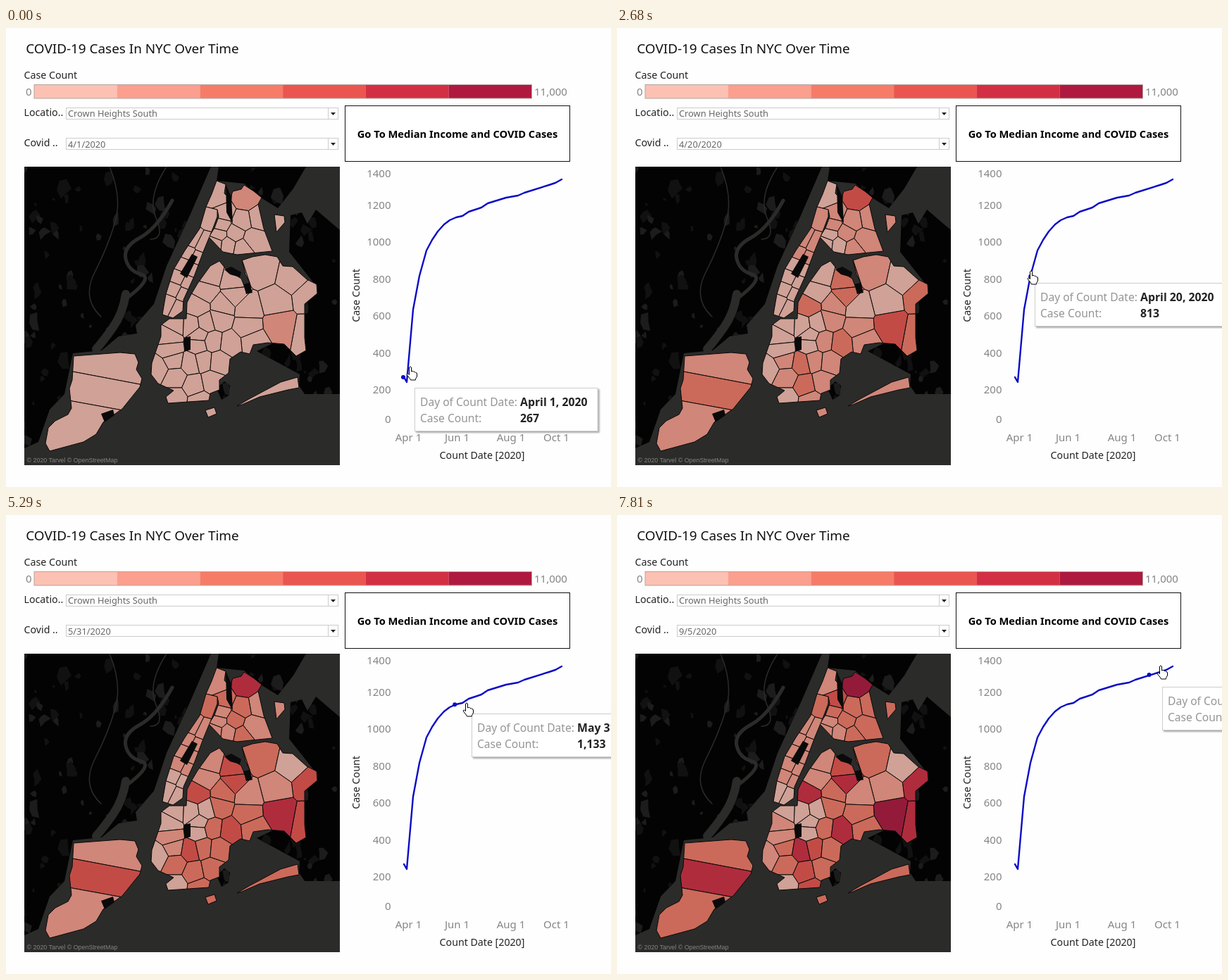
Write an HTML page that moves like this. It is 859 px wide and 652 px high and loops after 8 s.

```html
<!DOCTYPE html>
<html lang="en">
<head>
<meta charset="utf-8">
<title>COVID-19 Cases In NYC Over Time</title>
<style>
html, body { margin: 0; width: 100%; height: 100%; overflow: hidden; background: #fefefe; }
svg { display: block; width: 859px; height: 652px; font-family: "Noto Sans", "Open Sans", sans-serif; fill: #222; }
.label { font-size: 14.2px; font-weight: 500; }
.tick { font-size: 15px; fill: #858585; }
.field { font-size: 12.8px; fill: #666; }
.end { text-anchor: end; }
.mid { text-anchor: middle; }
.box { fill: #fff; stroke: #ccc; }
#tip { font-size: 15.8px; filter: drop-shadow(2px 2px 1px #0005); }
#tip .key { font-size: 15.6px; fill: #959595; }
#tip .val { font-weight: 600; }
.cell, .coast { stroke: #0a0a0a; stroke-linejoin: round; }
.cell { fill-opacity: .8; }
</style>
</head>
<body>
<svg viewBox="0 0 859 652">
  <defs id="clips">
    <clipPath id="frame"><rect x="26" y="197" width="448" height="424"/></clipPath>
    <clipPath id="shore"></clipPath>
  </defs>

  <text x="28.3" y="35.7" font-size="18.9" fill="#111">COVID-19 Cases In NYC Over Time</text>
  <text x="25.5" y="72" class="label">Case Count</text>
  <text x="28" y="96" class="tick">0</text>
  <text x="750" y="96" class="tick">11,000</text>
  <g id="legend"></g>

  <text x="25.5" y="124.5" class="label">Locatio..</text>
  <text x="25.5" y="168" class="label">Covid ..</text>
  <g id="fields"></g>
  <text x="88" y="126" class="field">Crown Heights South</text>
  <text x="88" y="169.5" class="field" id="date"></text>

  <rect x="481.5" y="110.5" width="319" height="79" fill="#fff" stroke="#111"/>
  <text x="641" y="156" class="mid" font-size="14.67" font-weight="700" fill="#000">Go To Median Income and COVID Cases</text>

  <g clip-path="url(#frame)">
    <rect x="26" y="197" width="448" height="424" fill="#2b2b2a"/>
    <g id="land"></g>
    <g id="woods" clip-path="url(#shore)"></g>
    <g fill="none" stroke="#2b2b2a" stroke-linecap="round">
      <path stroke-width="1.5" d="M147,197Q165,240 155,275T126,347T135,410M228,197Q200,240 213,270T205,300"/>
      <path stroke-width="5" d="M236,245Q214,285 190,298T170,328T192,350T170,385"/>
      <path stroke-width="12" d="M170,378Q166,405 152,425T128,456"/>
    </g>
    <g id="city"></g>
    <g id="parks" fill="#0a0a0a"></g>
    <text x="29.5" y="617" font-family="Liberation Sans, Arial, sans-serif" font-size="8.9" fill="#858585">© 2020 Tarvel © OpenStreetMap</text>
  </g>

  <g id="axes"></g>
  <text x="676" y="612" class="label mid">Count Date [2020]</text>
  <text transform="translate(502 380) rotate(-90)" class="label mid">Case Count</text>
  <polyline fill="none" stroke="#0b0bc6" stroke-width="2.4" stroke-linejoin="round" stroke-linecap="round"
    points="565,496 569,503 578,400 587,352 597,316 605,301 613,289 622,279 630,273 639,269 648,267 657,261 675,255 684,249 710,241 727,238 736,234 771,223 780,220 789,215"/>
  <circle id="dot" r="3" fill="#0b0bc6"/>

  <g id="tip">
    <rect class="box" id="card" x=".5" y=".5" height="61"/>
    <text class="key" x="8" y="26">Day of Count Date:</text>
    <text class="key" x="8" y="48.5">Case Count:</text>
    <text class="val" x="150" y="26" id="day"></text>
    <text class="val" x="150" y="48.5" id="count"></text>
  </g>
  <path id="hand" fill="#fff" stroke="#000" stroke-linejoin="round"
    d="M-1.5,1q1.5,-2 3,0v6l1,-.5q2,-.5 2.5,1q2,-.5 2.5,1q2,0 2,1.5v4l-2,3.5v1.5h-7l-1,-2 -4,-5q-1,-2 1,-2l2,1.5z"/>
</svg>

<script>
const $ = id => document.getElementById(id);
const add = (id, markup) => $(id).insertAdjacentHTML('beforeend', markup);

// Legend, drop-downs and axes
const shades = ['#fcc1b3', '#fc9f8e', '#f67c68', '#eb554f', '#d32f44', '#af193f'];
shades.forEach((c, i) =>
  add('legend', `<rect x="${40 + i * 117.7}" y="81" width="117.8" height="19" fill="${c}"/>`));
add('legend', '<rect x="40" y="80.5" width="706.5" height="19.5" fill="none" stroke="#b5a5a0"/>');

for (const y of [113.5, 156.5])
  add('fields', `<rect class="box" x="85.5" y="${y}" width="386" height="16"/>
    <path d="M457.5,${y}v16" stroke="#ccc"/><path d="M461,${y + 6.5}h7l-3.5,4z"/>`);

const countY = n => 566 - .262 * n;
for (let n = 0; n <= 1400; n += 200) {
  const y = Math.min(556, Math.max(207, countY(n)));
  add('axes', `<text class="tick end" x="546.5" y="${y + 5.3}">${n}</text>`);
}
Object.entries({ Apr: 571.5, Jun: 640.5, Aug: 717, Oct: 781.5 }).forEach(([month, x]) =>
  add('axes', `<text class="tick mid" x="${x}" y="587.3">${month} 1</text>`));

// Dark surroundings with faint seeded woods
const mainland = '26,197 291,197 262,264 228,338 210,392 184,422 186,434 160,438 136,458 95,462 83,520 62,542 46,588 26,597';
const north = '302,197 426,197 408,228 386,256 362,241 338,221 299,217';
const island = '404,266 420,262 428,278 440,258 474,287 474,520 424,520 416,508 417,492 356,459 395,440 440,366 402,318';
const marsh = '299,512 310,502 318,508 316,522 306,528';
for (const points of [mainland, north, island, marsh]) {
  add('land', `<polygon points="${points}" fill="#030303"/>`);
  add('shore', `<polygon points="${points}"/>`);
}

let seed = 7;
const rnd = () => (seed = seed * 16807 % 2147483647) / 2147483647;
for (let i = 0; i < 190; i++) {
  const x = 26 + rnd() * 448, y = 197 + rnd() * 400, r = 2 + rnd() * 7;
  const points = [0, 1, 2, 3, 4, 5].map(k => {
    const d = r * (.4 + rnd());
    return [x + d * Math.cos(k), y + d * Math.sin(k) * 1.3];
  });
  add('woods', `<polygon points="${points.join(' ')}" fill="${rnd() < .6 ? '#111' : '#1c1c1c'}"/>`);
}

// Each borough is a coast split into Voronoi districts; a site is x, y and its final colour level
const sites = text => text.split(' ').map(s => s.split(',').map(Number));
const manhattan = sites('291,267,2.6');
for (let u = 0; u <= 1; u += .2)
  for (const side of [-8, 8])
    manhattan.push([272 - 34 * u + side, 305 + 88 * u + side / 2, 1.9 - 1.1 * u]);

const boroughs = [
  ['96,466 162,461 183,463 188,475 185,485 193,498 190,510 165,541 138,560 128,577 110,588 62,601 56,590 60,568 70,558 88,549 93,540 90,512 94,500',
    sites('127,475,2.05 120,512,4.4 112,556,2.05')],
  ['299,217 312,222 310,235 318,243 322,232 334,229 338,223 352,232 363,241 358,250 366,285 378,317 328,322 308,318 288,297 296,284 302,268 300,258 284,254 292,236',
    sites('300,240,1.5 340,243,5.6 309,263,3.1 358,270,2.05 305,280,2.1 335,274,2.7 350,300,2.05 325,292,2.7 302,293,1.5 297,306,1.5 315,308,1.5 335,312,2.3')],
  ['284,254 300,258 300,268 294,284 280,318 267,353 252,386 251,402 237,412 222,407 227,378 238,343 254,316 275,285', manhattan],
  ['262,380 272,363 290,338 303,331 312,342 321,348 334,356 338,366 346,362 340,350 335,330 350,325 368,322 385,325 393,338 407,339 427,357 441,364 442,377 424,392 424,440 426,458 412,466 395,449 372,447 351,450 346,463 333,460 318,470 316,490 303,500 303,514 290,519 288,529 230,533 227,524 238,515 216,505 206,492 207,476 220,438 220,422 232,413 256,413 257,390',
    sites('290,352,1.5 284,374,1.5 322,360,3.9 324,379,4.5 364,346,2.7 405,355,.9 430,382,4.2 431,430,4.2 388,422,5.5 382,388,1.2 343,398,1.5 308,394,2.3 303,414,2.3 342,425,2.3 350,445,2.6 ' +
      '272,396,4 241,421,.8 263,422,.8 284,419,.8 232,438,1.02 274,437,.8 273,450,.8 293,445,2.3 318,448,4 234,458,1.2 216,484,1.1 238,472,2.2 240,496,2.6 262,476,4.5 280,472,3 302,474,2.9 267,508,3.4 292,503,2.9 240,526,.9 275,530,3.1')],
  ['328,537 345,527 390,503 414,496 416,511 400,514 360,524 335,535', sites('370,518,2.3')],
  ['283,543 296,539 299,548 287,553', sites('290,546,2.3')],
  ['381,265 395,267 396,276 384,290', sites('388,275,2.05')]
];

// Cut a large square down to the points nearer to site a than to any other
function cell(a, all) {
  let poly = [[0, 150], [500, 150], [500, 650], [0, 650]];
  for (const b of all) {
    if (b === a) continue;
    const dx = b[0] - a[0], dy = b[1] - a[1];
    const over = p => (p[0] - (a[0] + b[0]) / 2) * dx + (p[1] - (a[1] + b[1]) / 2) * dy;
    poly = poly.flatMap((p, i) => {
      const q = poly[(i + 1) % poly.length], s = over(p), e = over(q);
      const kept = s <= 0 ? [p] : [];
      if (s * e < 0) kept.push(p.map((v, j) => v + (q[j] - v) * s / (s - e)));
      return kept;
    });
  }
  return poly;
}

const districts = [];
boroughs.forEach(([coast, all], i) => {
  add('clips', `<clipPath id="coast${i}"><polygon points="${coast}"/></clipPath>`);
  add('city', `<polygon points="${coast}"/><g id="borough${i}" clip-path="url(#coast${i})"></g>
    <polygon class="coast" points="${coast}" fill="none"/>`);
  for (const site of all) {
    add('borough' + i, `<polygon class="cell" points="${cell(site, all).join(' ')}"/>`);
    districts.push({ el: $('borough' + i).lastElementChild, level: site[2] });
  }
});

for (const points of ['312,222 320,240 322,278 313,262', '264,321 272,325 257,355 247,349', '310,343 320,339 334,347 332,354 318,350',
  '337,364 346,362 350,376 341,378', '252,440 262,438 262,457 253,460', '135,548 152,542 154,550 140,560'])
  add('parks', `<polygon points="${points}"/>`);

// Move start and end, then what holds at the end: date, count, pointer x, y, tooltip x, y
const stops = [
  [0, 0, '4/1', 267, 574, 481, 580, 511],
  [60, 480, '4/5', 240, 574, 454, 582, 477],
  [480, 910, '4/12', 632, 573, 427, 584, 443],
  [1260, 1790, '4/12', 632, 587, 353, 591, 390],
  [1790, 1910, '4/20', 813, 588, 345, 593, 362],
  [2680, 3420, '5/1', 987, 609, 298, 612, 323],
  [3720, 4360, '5/17', 1092, 637, 274, 634, 295],
  [4540, 4590, '5/31', 1133, 640, 272, 645, 289],
  [5070, 5730, '6/14', 1167, 683, 256, 694, 269],
  [6040, 6040, '7/1', 1197, 683, 256, 694, 269],
  [6320, 7070, '8/1', 1240, 735, 238, 745, 258],
  [7130, 7810, '9/5', 1294, 772, 214, 774, 244]
];
const place = (id, x, y) => $(id).setAttribute('transform', `translate(${x} ${y})`);

function showDate([, , date, count]) {
  const day = new Date(date + '/2020');
  $('date').textContent = date + '/2020';
  $('day').textContent = day.toLocaleDateString('en-US', { dateStyle: 'long' });
  $('count').textContent = count.toLocaleString('en-US');
  $('card').setAttribute('width', 164 + $('day').getComputedTextLength());
  place('dot', 564 + 1.22 * (day - new Date('4/1/2020')) / 864e5, countY(count));
  // Every district grows in step with the charted curve
  const growth = count / stops.at(-1)[3];
  for (const { el, level } of districts) el.setAttribute('fill', shades[Math.floor(level * growth)]);
}

let shown;
function draw() {
  const t = performance.now() % 8000;
  const last = stops.findLast(s => s[1] <= t), next = stops.find(s => s[1] > t) || last;
  if (last !== shown) showDate(shown = last);
  const k = Math.max(0, (t - next[0]) / (next[1] - next[0] || 1));
  const [x, y, tx, ty] = last.slice(4).map((v, i) => Math.round(v + (next[i + 4] - v) * k));
  place('hand', x, y);
  place('tip', tx, ty);
  requestAnimationFrame(draw);
}
draw();
</script>
</body>
</html>
```
